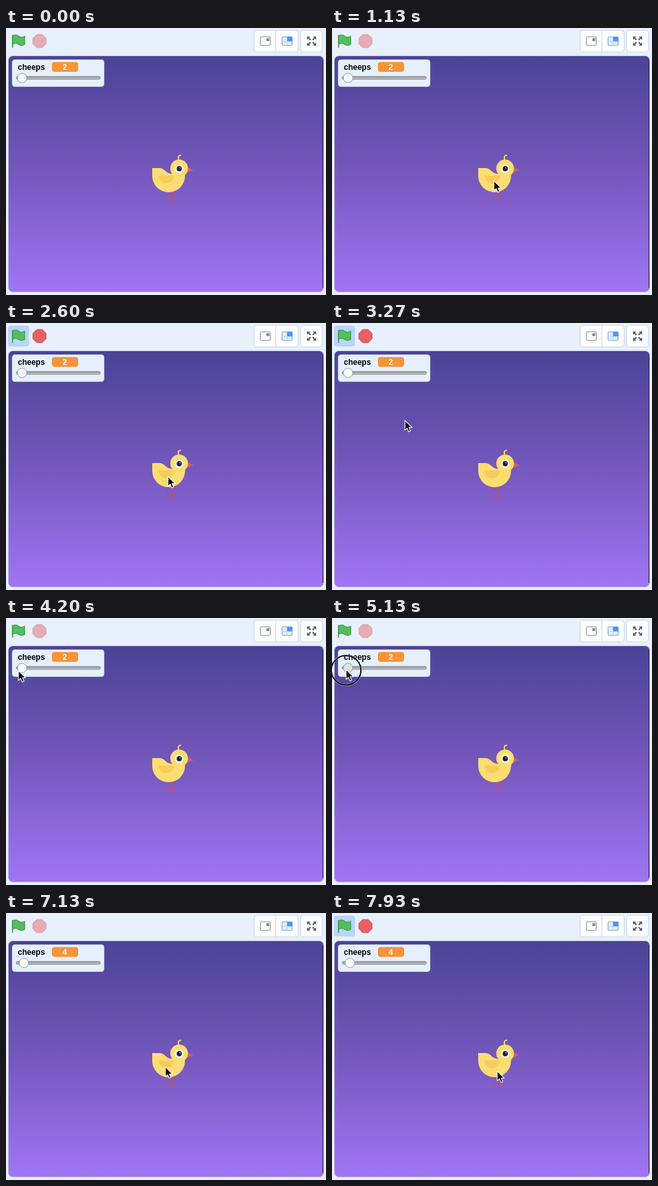
Recreate the animation shown at these times as an HTML page. Size 488 by 408 pixels, loop 8000 ms.

```html
<!DOCTYPE html>
<html lang="en">
<head>
<meta charset="utf-8">
<title>Cheeping chick</title>
<style>
  html, body { margin: 0; width: 100%; height: 100%; overflow: hidden; background: #e8f0fc; }
  svg { display: block; width: 488px; height: 408px; }
  text { font-family: "Liberation Sans", Arial, sans-serif; }
  .label { font-size: 12px; font-weight: bold; }
</style>
</head>
<body>
<svg viewBox="0 0 488 408">
  <defs>
    <linearGradient id="sky" x1="0" y1="0" x2="0" y2="1">
      <stop offset="0" stop-color="#4b4396"/>
      <stop offset=".5" stop-color="#7558bd"/>
      <stop offset="1" stop-color="#a175f6"/>
    </linearGradient>
    <linearGradient id="groove" x1="0" y1="0" x2="0" y2="1">
      <stop offset="0" stop-color="#8d9095"/>
      <stop offset="1" stop-color="#c6c9cd"/>
    </linearGradient>
  </defs>

  <!-- toolbar -->
  <rect id="glow" x="3" y="4" width="32" height="32" rx="4" fill="#b9d5fa"/>
  <g stroke="#459a4c" stroke-width="1.2" stroke-linecap="round" stroke-linejoin="round">
    <path d="M10 12.500C13 10.300 16.500 10.300 19.200 12.500S25.500 14.500 28.500 12.500V25C25.500 27 22 27 19.200 25S13 23 10 25Z" fill="#52bf5d"/>
    <path d="M10 11V29.500" fill="none" stroke-width="1.700"/>
  </g>
  <path id="stop" d="M46.800 10H55.200L61 15.800V24.200L55.200 30H46.800L41 24.200V15.800Z" stroke-linejoin="round"/>
  <g fill="#fff" stroke="#ccd5e4">
    <rect x="378.500" y="3.500" width="67" height="33" rx="4"/>
    <path d="M411.500 3.500V36.500"/>
    <rect x="449.500" y="3.500" width="33" height="33" rx="4"/>
  </g>
  <rect x="388" y="13.500" width="15" height="13" rx="1.500" fill="#fff" stroke="#8c91a0" stroke-width="1.200"/>
  <rect x="397" y="15.500" width="4.500" height="4.500" rx=".5" fill="#858a99"/>
  <rect x="421" y="13.500" width="15.500" height="13" rx="1.500" fill="#e4effd" stroke="#78a7ec" stroke-width="1.200"/>
  <path d="M428.500 13.500H435.500Q436.500 13.500 436.500 14.500V20.500H428.500Z" fill="#4f94f4"/>
  <path d="M428.500 20.500V26.500M421 20.500H428.500" stroke="#b7d1f6"/>
  <g id="arrows" fill="#596073"></g>

  <!-- stage -->
  <rect x="3.500" y="42.500" width="481" height="361" rx="7" fill="url(#sky)" stroke="#c3cde7"/>
  <path d="M483.400 49V397" stroke="#30264f" stroke-width="1.200"/>

  <!-- chick -->
  <g>
    <path d="M246.200 249V264.500H250M254.200 249V264.500H258" fill="none" stroke="#c64e5b" stroke-width="1.500"/>
    <path d="M276 212.500L286 217.300L276 221Z" fill="#d8605c"/>
    <path d="M264.600 203C261.500 198.500 262 194.500 267 194.300" fill="none" stroke="#fbdf7b" stroke-width="1.800"/>
    <path d="M223 214H235C241 214 245 223 253 223L273 221V226A25 25 0 0 1 223 226Z" fill="#fbdd73"/>
    <circle cx="264" cy="214.500" r="13.500" fill="#fbdd73"/>
    <path d="M232.500 225.500H256.500C255 233.500 250 237.200 243.500 237.200S234 232.500 232.500 225.500Z" fill="#f8cc59"/>
    <circle cx="264" cy="215" r="6.600" fill="#fff8e2"/>
    <circle cx="264.200" cy="215" r="3.900" fill="#20213f"/>
    <circle cx="265.300" cy="213.800" r=".8" fill="#fff"/>
  </g>

  <g id="bubble">
    <path d="M286 143.500H322A17 17 0 0 1 339 160.500V163A17 17 0 0 1 322 180H301C298 185 290 191.500 283 191.500C280 191.500 280.500 189.500 282 188C284 185.500 284.500 183 284.300 180A16.500 16.500 0 0 1 269 163V160.500A17 17 0 0 1 286 143.500Z" fill="#fff" stroke="#d9d2ee" stroke-width=".8"/>
    <text x="279" y="167" font-size="14" fill="#575e75">cheep</text>
  </g>

  <!-- variable slider -->
  <rect x="9.500" y="48.500" width="140" height="41" rx="4" fill="#e6f0fd" stroke="#c1d0e8"/>
  <text class="label" x="18" y="64">cheeps</text>
  <rect x="70" y="52" width="40" height="15" rx="4" fill="#f99437"/>
  <text id="count" class="label" x="89.500" y="63.500" text-anchor="middle" fill="#fff">2</text>
  <rect x="15.500" y="74" width="128.500" height="4.500" rx="2.250" fill="url(#groove)" stroke="#7f8388" stroke-width=".8"/>
  <circle id="thumb" cy="76.300" r="7.200" stroke="#8b8e93" stroke-width=".9"/>

  <!-- pointer -->
  <g id="pointer">
    <g id="ring" fill="none">
      <circle cy="1" r="22.800" stroke="#fff" stroke-opacity=".55" stroke-width="3.200"/>
      <circle cy="1" r="22.600" stroke="#0b0a12" stroke-width="2"/>
    </g>
    <path d="M0 0V15L3.400 11.900L5.800 17.400L8.500 16.200L6.100 10.900H10.800Z" fill="#000" stroke="#fff" stroke-width="1.100" stroke-linejoin="round"/>
  </g>
</svg>

<script>
const LOOP = 8000;
const $ = id => document.getElementById(id);

// time, x, y
const path = [
  [70, 480, 404], [300, 372, 316], [500, 284, 256], [730, 247, 233],
  [1870, 247, 234.5], [3000, 247, 234.5], [3130, 196, 204], [3270, 111.500, 149],
  [3500, 45, 100], [3800, 20, 82], [4200, 19, 80.500], [4530, 20, 79],
  [4870, 20.500, 79], [5600, 23.500, 78.500], [5730, 24, 78.500], [6000, 27, 78.500],
  [6400, 27, 78.500], [6600, 74, 112], [6800, 158, 176], [7000, 226, 223],
  [7200, 252, 241.500], [LOOP, 252, 241.500]
];
const cheeps = [[1870, 2470], [2670, 3240], [7330, 7900]];
const presses = [[1870, 2100], [4530, 6400], [7330, 7540]];
const running = [[1870, 3480], [7330, LOOP]];

const within = (spans, t) => spans.some(([a, b]) => t >= a && t < b);
const show = (id, on) => $(id).setAttribute("visibility", on ? "visible" : "hidden");

function place(t) {
  const i = Math.max(1, path.findIndex(p => p[0] > t));
  const [a, b] = [path[i - 1], path[i]];
  const k = Math.max(0, (t - a[0]) / (b[0] - a[0]));
  return [a[1] + (b[1] - a[1]) * k, a[2] + (b[2] - a[2]) * k];
}

$("arrows").innerHTML = [0, 90, 180, 270].map(r =>
  `<path transform="translate(466 20) rotate(${r})" d="M7 -7V-2L5.300 -3.700L2.500 -.900L.9 -2.500L3.700 -5.300L2 -7Z"/>`
).join("");

function draw(t) {
  const [x, y] = place(t);
  const value = t < 5730 ? 2 : t < 5930 ? 3 : 4;
  const active = within(running, t);
  const dragging = t >= 4530 && t < 6400;

  $("pointer").setAttribute("transform", `translate(${x} ${y})`);
  $("pointer").setAttribute("display", t < 70 ? "none" : "inline");
  show("ring", within(presses, t));
  show("bubble", within(cheeps, t));
  show("glow", active);
  $("stop").setAttribute("fill", active ? "#ea6064" : "#e6abb4");
  $("stop").setAttribute("stroke", active ? "#bf4c50" : "#d69ba5");
  $("count").textContent = value;
  $("thumb").setAttribute("cx", 24.500 + (value - 2) * 1.400);
  $("thumb").setAttribute("fill", dragging ? "#dcdee0" : "#fafbfc");
}

const start = performance.now();
function tick() {
  draw((performance.now() - start) % LOOP);
  requestAnimationFrame(tick);
}
tick();
</script>
</body>
</html>
```
